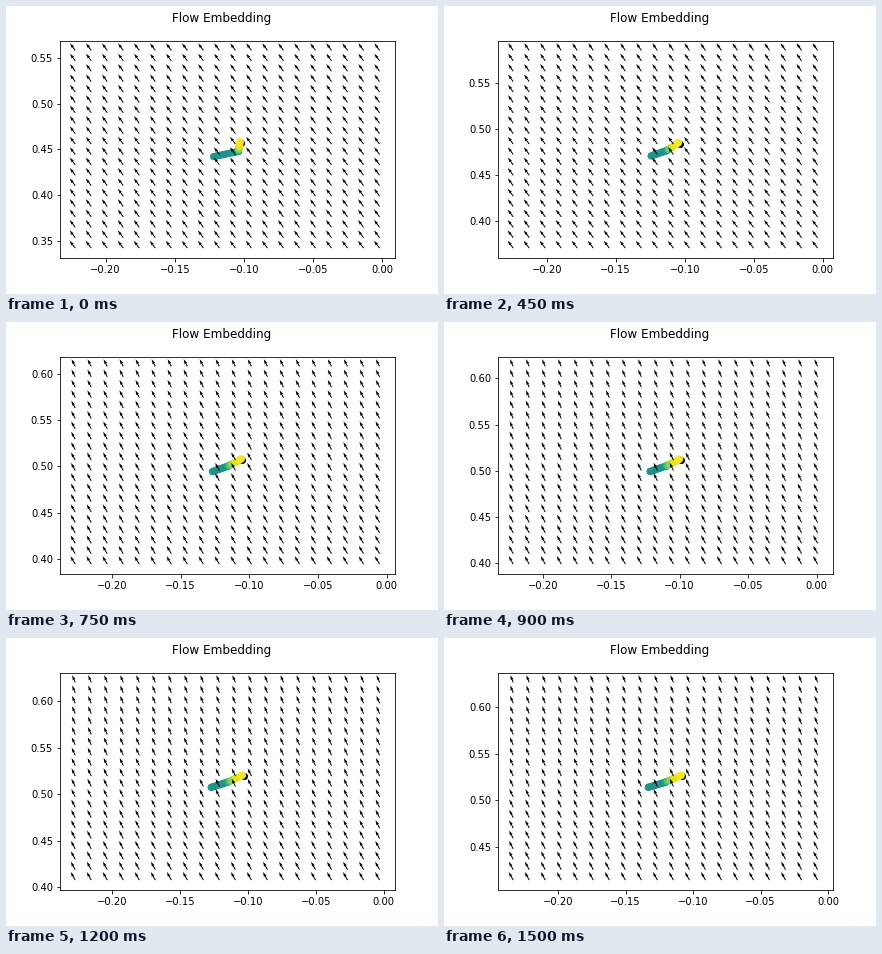
These frames come from a looping animation (432x288 px, 1.65 s). A matplotlib script:

```python
import numpy as np
import matplotlib.pyplot as plt
from matplotlib.animation import FuncAnimation
from matplotlib.ticker import MultipleLocator

plt.rcParams["font.family"] = "DejaVu Sans"

GRID = 20
PAD = 0.1        # field reaches this far beyond the points
MARGIN = 0.05
LAST = 9
DOTS = 9         # points on each arm of the chain

# waypoints of the chain's centre: step, x, y
PATH = np.array([
    (0, -.1120, .4500), (1, -.1115, .4680), (3, -.1164, .4883),
    (4, -.1159, .5013), (5, -.1104, .5060), (6, -.1115, .5092),
    (7, -.1150, .5139), (9, -.1205, .5204),
])
JITTER = np.random.default_rng(4).uniform(-.03, .03, 2 * DOTS)


def extent(step):
    """Lower left corner and size of the box around the points."""
    centre = np.array([np.interp(step, PATH[:, 0], PATH[:, i]) for i in (1, 2)])
    size = np.array([.0198 + .0055 * (step / LAST) ** 1.3,
                     .0128 + .0032 * np.exp(-.35 * step)])
    return centre - size / 2, size


def chain(step):
    """Unit-square positions and tones of the points."""
    fade = np.exp(-step)
    elbow = np.array([.50 + .40 * fade, .42 - .07 * fade])
    t = np.linspace(0, 1, DOTS)
    first = t[:, None] * elbow
    second = elbow + t[:, None] * ((.96, 1) - elbow)
    tone = np.r_[np.full(DOTS, .51), .96 - .40 * (1 - t) ** 3] + JITTER
    return np.vstack([first, second]), tone


def flow(step):
    """Arrow components, turning upright with time and height."""
    turn = 1 / (1 + np.exp(-3 * (step - 3.7)))
    low = 127 - 8 * turn
    high = 126 - 10 * turn - .5 * step
    angle = np.radians(np.linspace(low, high, GRID))
    length = np.linspace(1, .95 - .1 * turn, GRID)
    column = np.array([length * np.cos(angle), length * np.sin(angle)])
    return np.repeat(column[:, :, None], GRID, axis=2)


fig = plt.figure(figsize=(6, 4), dpi=72)
fig.suptitle("Flow Embedding", fontsize=12)
ax = fig.add_axes([.125, .125, .775, .755])


def draw(frame):
    step = max(frame - 1, 0)    # the first step lasts two ticks
    ax.clear()
    corner, size = extent(step)

    dots, tone = chain(step)
    ax.scatter(*(corner + (1, .92) * size), c="black", s=36)
    ax.scatter(*(corner + dots * size).T, c=tone, s=42,
               cmap="viridis", vmin=0, vmax=1)

    start, end = corner - PAD, corner + size + PAD
    x, y = np.meshgrid(np.linspace(start[0], end[0], GRID),
                       np.linspace(start[1], end[1], GRID))
    ax.quiver(x, y, *flow(step), scale=1.8 * GRID)

    edge = MARGIN * (end - start)
    ax.set_xlim(start[0] - edge[0], end[0] + edge[0])
    ax.set_ylim(start[1] - edge[1], end[1] + edge[1])
    ax.xaxis.set_major_locator(MultipleLocator(.05))
    ax.yaxis.set_major_locator(MultipleLocator(.05))
    return []


anim = FuncAnimation(fig, draw, frames=LAST + 2, interval=150,
                     init_func=lambda: draw(0), repeat=True, repeat_delay=0)
plt.show()
```
